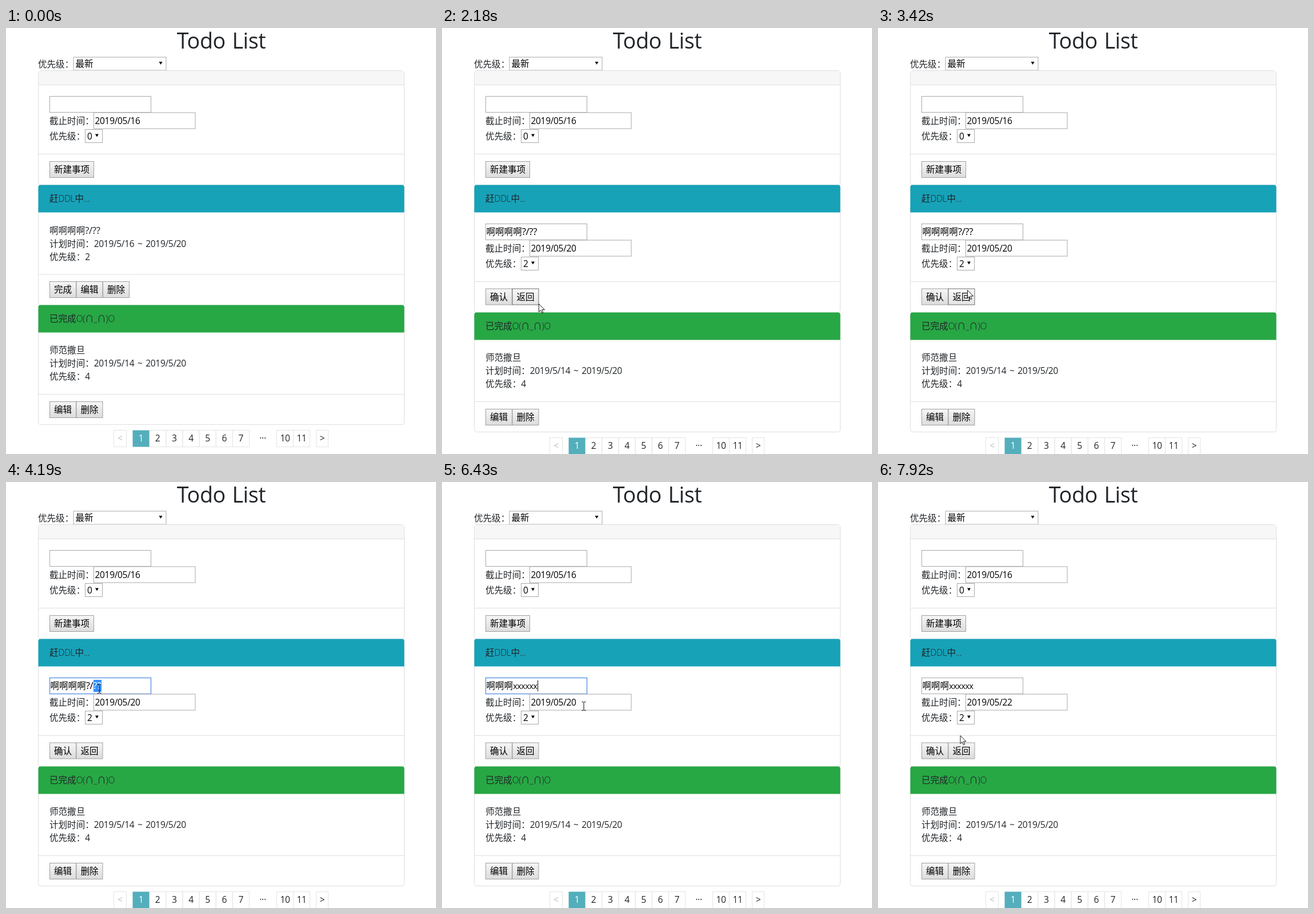
Animation, 752 px wide and 745 px high, one loop 8000 ms. Source, as an HTML page:

```html
<!DOCTYPE html>
<html lang="zh">
<head>
<meta charset="utf-8">
<title>Todo List</title>
<style>
html, body { margin: 0; width: 100%; height: 100%; overflow: hidden; background: #fff; }
svg { display: block; }
text { font-family: "Open Sans", "Noto Sans CJK SC", "Noto Sans CJK", sans-serif; }
.latin { letter-spacing: -.34px; word-spacing: 2px; }
.cal text { font-family: "Liberation Sans", Arial, sans-serif; }
</style>
</head>
<body>
<svg id="stage" width="752" height="745" viewBox="0 0 752 745">
  <defs>
    <linearGradient id="up" x2="0" y2="1"><stop stop-color="#f6f6f6"/><stop offset="1" stop-color="#dcdcdc"/></linearGradient>
    <linearGradient id="over" x2="0" y2="1"><stop stop-color="#fafafa"/><stop offset="1" stop-color="#e4e4e4"/></linearGradient>
    <linearGradient id="down" x2="0" y2="1"><stop stop-color="#e4e4e4"/><stop offset="1" stop-color="#f4f4f4"/></linearGradient>
  </defs>
  <g id="view"></g>
</svg>
<script>
const LOOP = 8000, INK = '#212529', LINE = '#dfdfdf';
const view = document.getElementById('view');

// Pointer path: time, x, y
const PATH = [
  [180, 532, 582], [420, 400, 510], [640, 240, 400], [720, 185, 391], [950, 156, 448],
  [1030, 156, 448], [1180, 156, 458], [1800, 156, 458], [1870, 167, 458], [2050, 167, 458],
  [2180, 169, 482], [2260, 157, 475], [2960, 157, 475], [3190, 156, 458], [3500, 156, 458],
  [3810, 182, 362], [4100, 172, 360], [4410, 142, 366], [4510, 142, 366], [4810, 134, 372],
  [5110, 134, 372], [5190, 129, 376], [5350, 129, 376], [5420, 129, 383], [5580, 129, 383],
  [5960, 238, 384], [6080, 238, 384], [6430, 248, 392], [6600, 248, 392], [7000, 262, 540],
  [7210, 273, 583], [7540, 273, 583], [7920, 143.5, 443]
];

function pointer(t) {
  const i = PATH.findIndex(p => p[0] > t);
  if (i < 0) return PATH[PATH.length - 1].slice(1);
  const a = PATH[i - 1] || PATH[0], b = PATH[i];
  const k = i ? (t - a[0]) / (b[0] - a[0]) : 0;
  return [a[1] + (b[1] - a[1]) * k, a[2] + (b[2] - a[2]) * k];
}

const rect = (x, y, w, h, fill, stroke = 'none', more = '') =>
  `<rect x="${x}" y="${y}" width="${w}" height="${h}" fill="${fill}" stroke="${stroke}" ${more}/>`;
const hline = y => rect(57, y, 639, 1, LINE);
const label = (x, y, s, { fill = INK, latin = 15.55, anchor = 'start', more = '' } = {}) =>
  `<text x="${x}" y="${y}" fill="${fill}" text-anchor="${anchor}" ${more}>` +
  s.split(/([ -~∩·]+)/).filter(Boolean).map(run => /[ -~∩·]/.test(run)
    ? `<tspan class="latin" font-size="${latin}">${run}</tspan>`
    : `<tspan font-size="15.55">${run}</tspan>`).join('') + '</text>';

const field = (x, y, w, h, focus) =>
  rect(x + .5, y + .5, w - 1, h - 1, '#fff', focus ? '#5b94e3' : '#a9a9a9', focus ? 'stroke-width="1.4"' : '');
const drop = (x, y, w, s) => field(x, y, w, 24) + label(x + 4, y + 17.5, s, { fill: '#000' }) +
  `<path d="M${x + w - 13} ${y + 8.5}h6l-3 5z" fill="#000"/>`;

function button(x, y, w, s, [px, py], pressed) {
  const over = px >= x && px < x + w && py >= y && py < y + 28;
  const fill = over ? (pressed ? 'down' : 'over') : 'up';
  return rect(x + .5, y + .5, w - 1, 28, `url(#${fill})`, over ? '#707070' : '#a0a0a0') +
    label(x + w / 2, y + 20, s, { fill: '#000', anchor: 'middle' });
}
const buttons = (y, names, p, pressed) =>
  names.map((s, i) => button(76 + 46.5 * i, y, 47, s, p, pressed)).join('');

const frame = (y, h) => rect(56.5, y + .5, 640, h, '#fff', LINE, 'rx="4"');
const head = (y, color, s) =>
  `<path d="M56.5 ${y + 48.5}v-44q0-4 4-4h632q4 0 4 4v44z" fill="${color}"/>` +
  label(76, y + 29.5, s, { more: 'font-weight="300"' });
const details = (y, name, from, level) =>
  label(76, y, name, { latin: 16.8 }) +
  label(76, y + 23, `计划时间：${from} ~ 2019/5/20`) +
  label(76, y + 46, `优先级：${level}`);
const form = (y, date, level, focus) =>
  field(76, y, 178, 29, focus) +
  label(76, y + 48.5, '截止时间：') + field(153, y + 28.5, 178.5, 29) +
  label(155.5, y + 48.5, date, { fill: '#000' }) +
  label(76, y + 75.5, '优先级：') + drop(138, y + 58, 31, level);

function pager() {
  const cell = (x, w, s, ink = INK, fill = '#fff', stroke = '#e4e4e4') =>
    rect(x + .5, 703.5, w, 29, fill, stroke) +
    label(x + w / 2 + .5, 722.5, s, { fill: ink, anchor: 'middle' });
  let out = cell(188, 22, '&lt;', '#bbb');
  for (let i = 6; i > 0; i--) out += cell(221 + 29.15 * i, 29, `${i + 1}`);
  return out + cell(221, 29, '1', '#fff', '#54aebc', 'none') +
    label(449, 722.5, '···', { anchor: 'middle' }) +
    cell(473, 29, '10') + cell(502, 29, '11') + cell(542, 21, '&gt;');
}

function nameText(t, x) {
  const typed = t < 5580 ? -1 : Math.min(6, 1 + Math.floor((t - 5580) / 76));
  const text = fill => label(77.5, 362, typed < 0 ? '啊啊啊啊?/??' : '啊啊啊' + 'x'.repeat(typed),
    { fill, latin: typed < 0 ? 16.8 : 14.2 });
  let out = text('#000');
  if (t >= 4100 && t < 5580) {
    const left = [125, 140, 147, 153, 160, 167].find(e => x < e + 11) || 167;
    const w = 167 - left;
    if (w) out += rect(left, 346, w, 21, '#3390ff') +
      `<svg x="${left}" y="346" width="${w}" height="21" viewBox="${left} 346 ${w} 21">${text('#fff')}</svg>`;
  } else if (typed >= 0 && t < 6510) {
    out += rect(124.5 + 7.1 * typed, 347, 1, 19, '#000');
  }
  return out;
}

// Calendar for May 2019, drawn in its own units
function calendar([px, py]) {
  const ox = 153.5, oy = 409, k = .972, step = 32.5;
  const mx = (px - ox) / k, my = (py - oy) / k;
  const word = (x, y, s, fill = '#000', size = 12.8, weight = 400) =>
    `<text x="${x}" y="${y + size * .35}" font-size="${size}" font-weight="${weight}" fill="${fill}" text-anchor="middle">${s}</text>`;
  let out = rect(.5, .5, 241.4, 233, '#fff', '#aeaeae', 'rx="4.8"') +
    '<path d="M.5 56.5V5.3Q.5.5 5.3.5H50L58-7.5 66 .5H237.1q4.8 0 4.8 4.8V56.5z" fill="#f0f0f0" stroke="#aeaeae"/>' +
    '<path d="M17.2 17.2l7.2-7.2v14.4zM225.2 17.2l-7.2-7.2v14.4z" fill="#ccc"/>' +
    word(121.2, 20.3, 'May 2019', '#000', 15.1, 700);
  ['Su', 'Mo', 'Tu', 'We', 'Th', 'Fr', 'Sa'].forEach((s, i) => out += word(23.6 + step * i, 46, s));
  for (let i = 0; i < 35; i++) {
    const x = 23.6 + step * (i % 7), y = 78.9 + step * Math.floor(i / 7);
    const date = new Date(2019, 3, 28 + i).getDate();
    const over = Math.abs(mx - x) < 13.6 && Math.abs(my - y) < 13.6;
    const chosen = date === 20, today = date === 16;
    if (chosen || over)
      out += rect(x - 13.6, y - 13.6, 27.2, 27.2, chosen ? (over ? '#1d5d90' : '#216ba5') : '#f0f0f0', 'none', 'rx="4.8"');
    out += word(x, y, date, chosen ? '#fff' : '#000', 12.8, today ? 700 : 400);
  }
  return `<g class="cal" transform="translate(${ox} ${oy}) scale(${k})">${out}</g>`;
}

const cursor = ([x, y], beam) => `<g transform="translate(${x} ${y})">` + (beam
  ? '<path d="M-3.5-7.5h2.5l1 1 1-1h2.5M0-6.5V6.5M-3.5 7.5h2.5l1-1 1 1h2.5" fill="none" stroke="#000"/>'
  : '<path d="M.5.5V14.6L3.7 11.6 6 16.6 8.1 15.7 5.9 10.8H10.6z" fill="#fff" stroke="#000" stroke-width=".9"/>') + '</g>';

function scene(t) {
  const p = t < 180 ? [-99, -99] : pointer(t);
  const editing = t >= 1560 && t < 2480 || t >= 3345;
  const pressed = t >= 1490 && t < 1560 || t >= 2410 && t < 2480 || t >= 3270 && t < 3345;
  const picking = t >= 6510 && t < 7380;
  const shift = editing ? 13 : 0;

  let out = label(376.5, 35.5, 'Todo List', { latin: 37.6, anchor: 'middle', more: 'font-weight="500"' }) +
    label(56, 68.5, '优先级：') + drop(117.5, 50.5, 163, '最新') +
    frame(74, 200) + rect(57, 75, 639, 24, '#f7f7f7') + hline(99) +
    form(119, '2019/05/16', '0') + hline(220) + button(76, 233, 78, '新建事项', p) +
    frame(274, 210 + shift) + head(274, '#17a2b8', '赶DDL中...');

  if (editing) {
    out += form(342, t < 7380 ? '2019/05/20' : '2019/05/22', '2', t >= 3960 && t < 6510) + nameText(t, p[0]) +
      (picking ? rect(153.5, 371, 177.5, 28, 'none', '#5b94e3', 'stroke-width="1.4"') : '') +
      hline(443) + buttons(455.5, ['确认', '返回'], p, pressed);
  } else {
    out += details(359.5, '啊啊啊啊?/??', '2019/5/16', 2) + hline(430.5) +
      buttons(443, ['完成', '编辑', '删除'], p, pressed);
  }

  out += `<g transform="translate(0 ${shift})">` + frame(484, 209) + head(484, '#28a745', '已完成O(∩_∩)O') +
    details(569, '师范撒旦', '2019/5/14', 4) + hline(640) +
    buttons(653, ['编辑', '删除'], [p[0], p[1] - shift], pressed) + pager() + '</g>';

  if (picking) out += calendar(p);
  return out + cursor(p, t >= 3680 && t < 6640);
}

let shown = '';
function tick(now) {
  const next = scene(now % LOOP);
  if (next !== shown) view.innerHTML = shown = next;
  requestAnimationFrame(tick);
}
tick(0);
</script>
</body>
</html>
```
